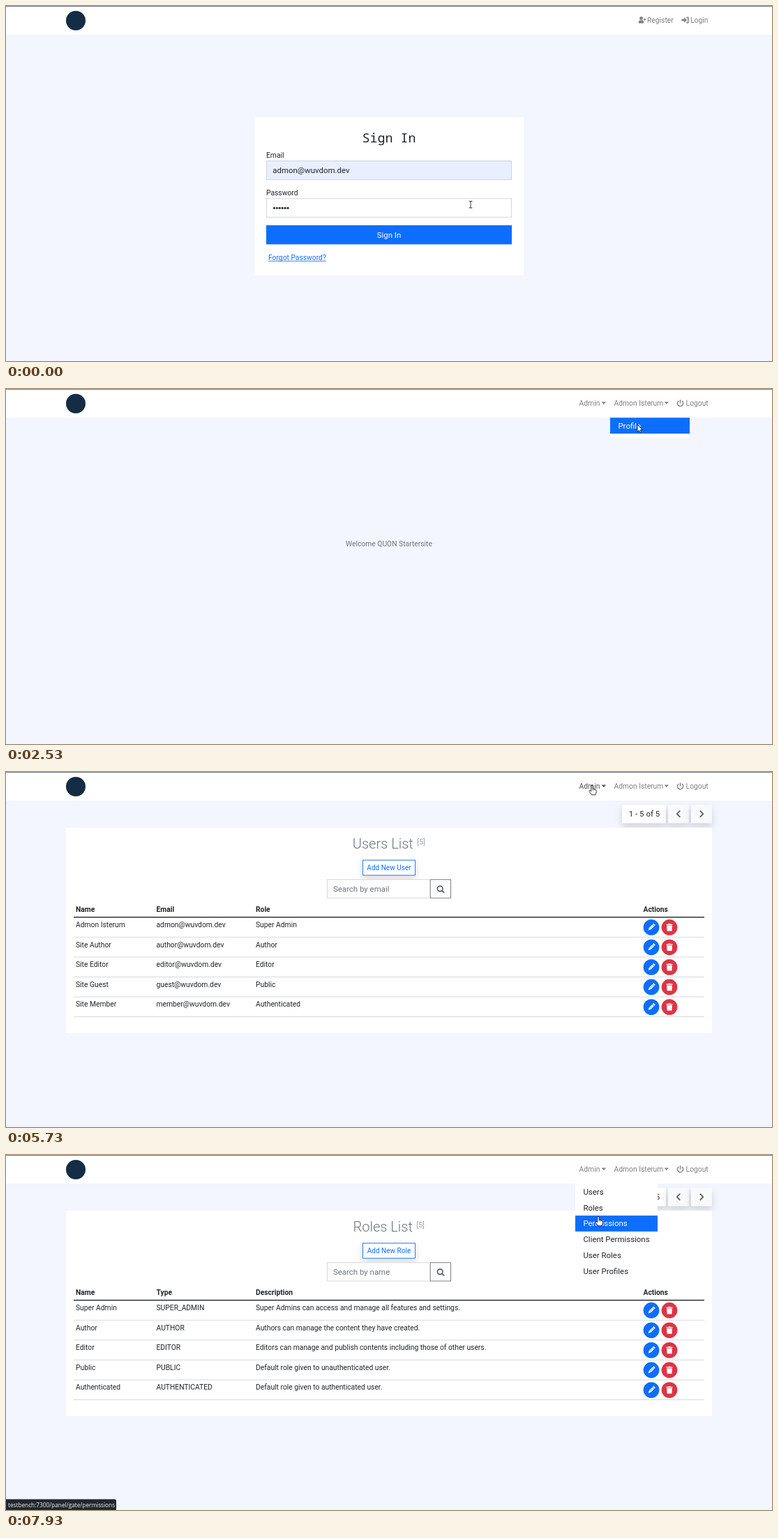
These frames come from a looping animation (1098 px wide and 510 px high, 8000 ms). An HTML page with a canvas:

```html
<!DOCTYPE html>
<html lang="en">
<head>
<meta charset="utf-8">
<title>Admin panel walkthrough</title>
<style>
  html, body { margin: 0; width: 100%; height: 100%; overflow: hidden; background: #f3f6fe; }
  canvas { display: block; width: 1098px; height: 510px; }
</style>
</head>
<body>
<canvas id="stage"></canvas>
<script>
const W = 1098, H = 510, LOOP = 8000, STEP = 200 / 3;
const canvas = document.getElementById('stage');
const dpr = window.devicePixelRatio || 1;
canvas.width = W * dpr;
canvas.height = H * dpr;
const c = canvas.getContext('2d');

const SANS = 'Roboto, sans-serif', MONO = '"Noto Sans Mono", monospace', UI = '"Open Sans", sans-serif';
const BASE = 11.45, SMALL = 10.3;
const INK = '#212529', MUTED = '#6c757d', BLUE = '#0d6efd', RED = '#dc3545', BORDER = '#ced4da';
const PERSON = 'Admon Isterum';
const HOST = 'testbench:7300/panel/gate/';

const adminItems = ['Users', 'Roles', 'Permissions', 'Client Permissions', 'User Roles', 'User Profiles'];

const lists = {
  users: {
    title: 'Users List', add: 'Add New User', search: 'Search by email',
    head: ['Name', 'Email', 'Role'],
    rows: [
      [PERSON, 'admon@wuvdom.dev', 'Super Admin'],
      ['Site Author', 'author@wuvdom.dev', 'Author'],
      ['Site Editor', 'editor@wuvdom.dev', 'Editor'],
      ['Site Guest', 'guest@wuvdom.dev', 'Public'],
      ['Site Member', 'member@wuvdom.dev', 'Authenticated']
    ]
  },
  roles: {
    title: 'Roles List', add: 'Add New Role', search: 'Search by name',
    head: ['Name', 'Type', 'Description'],
    rows: [
      ['Super Admin', 'SUPER_ADMIN', 'Super Admins can access and manage all features and settings.'],
      ['Author', 'AUTHOR', 'Authors can manage the content they have created.'],
      ['Editor', 'EDITOR', 'Editors can manage and publish contents including those of other users.'],
      ['Public', 'PUBLIC', 'Default role given to unauthenticated user.'],
      ['Authenticated', 'AUTHENTICATED', 'Default role given to authenticated user.']
    ]
  }
};

// Timeline: start time, then value
const pages = [[0, 'login'], [800, 'home'], [2730, 'profile'], [5130, 'users'], [6340, 'roles']];

const menus = [
  { from: 2190, to: 2725, x: 866, w: 114, items: ['Profile'] },
  { from: 3930, to: 5070, x: 816, w: 118, items: adminItems },
  { from: 5860, to: 6340, x: 816, w: 118, items: adminItems },
  { from: 7260, to: LOOP, x: 816, w: 118, items: adminItems }
];

const statuses = [
  { from: 500, to: 1370, w: 365, text: 'Waiting for localhost...' },
  { from: 4670, to: 5450, w: 133, text: HOST + 'users' },
  { from: 6270, to: 6800, w: 132, text: HOST + 'roles' },
  { from: 7670, to: 9000, w: 158, text: HOST + 'permissions' }
];

// time, x, y, pointer kind from that time on
const path = [
  [0, 666, 285, 'beam'], [70, 666, 285, 'beam'], [200, 668, 306, 'arrow'], [260, 669, 320, 'hand'],
  [400, 671, 335, 'hand'], [800, 671, 335, 'arrow'], [1000, 710, 213.5, 'arrow'], [1330, 884, 26, 'hand'],
  [1470, 893, 21, 'hand'], [2270, 904, 18, 'hand'], [2400, 905, 45, 'arrow'], [2530, 905, 51, 'arrow'],
  [2860, 905, 51, 'arrow'], [3460, 839, 19.5, 'arrow'], [3530, 839, 19.5, 'hand'], [4060, 839, 19.5, 'hand'],
  [4330, 839, 46, 'arrow'], [4470, 839, 56, 'arrow'], [5260, 839, 56, 'arrow'], [5660, 840, 19, 'hand'],
  [5870, 840, 19, 'hand'], [5930, 841, 67, 'arrow'], [6130, 841, 69, 'arrow'], [6270, 841, 69, 'arrow'],
  [6400, 840, 60, 'arrow'], [6560, 840, 56, 'arrow'], [6930, 840, 19, 'hand'], [7330, 840, 19, 'hand'],
  [7600, 847, 76, 'hand'], [7800, 849, 88, 'hand'], [LOOP, 849, 88, 'hand']
];

function rect(x, y, w, h, color) {
  c.fillStyle = color;
  c.fillRect(x, y, w, h);
}

function box(x, y, x2, y2, fill, stroke = BORDER) {
  rect(x, y, x2 - x, y2 - y, fill);
  c.strokeStyle = stroke;
  c.lineWidth = 0.9;
  c.strokeRect(x + 0.45, y + 0.45, x2 - x - 0.9, y2 - y - 0.9);
}

function disc(x, y, r, color) {
  c.fillStyle = color;
  c.beginPath();
  c.arc(x, y, r, 0, 7);
  c.fill();
}

function line(points, color, width) {
  c.strokeStyle = color;
  c.lineWidth = width;
  c.beginPath();
  points.forEach(([x, y]) => c.lineTo(x, y));
  c.stroke();
}

function poly(points, color) {
  c.fillStyle = color;
  c.beginPath();
  points.forEach(([x, y]) => c.lineTo(x, y));
  c.fill();
}

// y is the middle of the capital letters
function text(str, x, y, size = BASE, color = INK, { align = 'left', weight = 400, family = SANS } = {}) {
  c.font = `${weight} ${size}px ${family}`;
  c.textAlign = align;
  c.fillStyle = color;
  c.fillText(str, x, y + size * 0.355);
  return c.measureText(str).width;
}

function shadowBox(x, y, x2, y2, fill) {
  c.save();
  c.shadowColor = 'rgba(0,0,0,.15)';
  c.shadowBlur = 11 * dpr;
  c.shadowOffsetY = 5 * dpr;
  rect(x, y, x2 - x, y2 - y, fill);
  c.restore();
}

function caret(x, color) {
  poly([[x, 18.6], [x + 6.4, 18.6], [x + 3.2, 21.9]], color);
}

function userPlus(x, color) {
  disc(x + 3.7, 17.7, 2.4, color);
  c.beginPath();
  c.roundRect(x, 20.5, 7.4, 4.3, [2.4, 2.4, 0.8, 0.8]);
  c.fill();
  line([[x + 7, 19.3], [x + 10.6, 19.3]], color, 1.1);
  line([[x + 8.8, 17.5], [x + 8.8, 21.1]], color, 1.1);
}

function signIn(x, color) {
  rect(x, 18.8, 4, 2.7, color);
  poly([[x + 3.6, 16.3], [x + 7.6, 20.15], [x + 3.6, 24]], color);
  line([[x + 6.8, 16.4], [x + 9.4, 16.4], [x + 9.4, 23.9], [x + 6.8, 23.9]], color, 1.5);
}

function power(x, color) {
  c.strokeStyle = color;
  c.lineWidth = 1.5;
  c.beginPath();
  c.arc(x, 20.5, 4.1, -0.95, Math.PI + 0.95);
  c.stroke();
  line([[x, 15.4], [x, 20.5]], color, 1.5);
}

function pencil(x, y) {
  c.save();
  c.translate(x, y);
  c.rotate(Math.PI / 4);
  rect(-1.7, -6.4, 3.4, 2, '#fff');
  rect(-1.7, -3.8, 3.4, 6.4, '#fff');
  poly([[-1.7, 2.6], [1.7, 2.6], [0, 6.2]], '#fff');
  line([[0, -2.6], [0, 2]], BLUE, 0.6);
  c.restore();
}

function trash(x, y) {
  rect(x - 4.5, y - 4.6, 9, 1.3, '#fff');
  rect(x - 1.5, y - 5.4, 3, 1, '#fff');
  poly([[x - 3.9, y - 2.6], [x + 3.9, y - 2.6], [x + 3.4, y + 5.2], [x - 3.4, y + 5.2]], '#fff');
}

function drawNav(page, cur, dx) {
  rect(0, 0, W, 41, '#fff');
  disc(100 + dx, 21, 14, '#142c44');
  const tone = (a, b) => cur.y < 30 && cur.x - dx >= a && cur.x - dx <= b ? '#4d4d4d' : '#7f7f7f';
  const nav = (str, x, a, b) => text(str, x + dx, 20.3, SMALL, tone(a, b));
  if (page === 'login') {
    userPlus(906.8, '#7f7f7f');
    nav('Register', 919, 900, 958);
    signIn(968.4, '#7f7f7f');
    nav('Login', 981, 966, 1008);
  } else {
    nav('Admin', 821.6, 816, 862);
    caret(853.6 + dx, tone(816, 862));
    nav(PERSON, 871.5, 866, 952);
    caret(943.6 + dx, tone(866, 952));
    power(966.5 + dx, '#7f7f7f');
    nav('Logout', 974.6, 956, 1008);
  }
}

function drawLogin(t, cur) {
  rect(356, 160, 386, 227, '#fff');
  text('Sign In', 549, 189.5, 18.37, INK, { align: 'center', family: MONO });
  text('Email', 373, 214.3, SMALL);
  box(373, 222, 725, 250, '#e8f0fe');
  text('admon@wuvdom.dev', 382.3, 236.3);
  text('Password', 373, 268.3, SMALL);
  box(373, 276.3, 725, 303.8, '#fff');
  for (let i = 0; i < 6; i++) disc(384.4 + i * 3.93, 290.2, 1.55, INK);
  const over = cur.y > 315 && cur.y < 342;
  rect(373, 315, 352, 27.4, over ? '#0b5ed7' : BLUE);
  text('Sign In', 549, 328.9, BASE, '#fff', { align: 'center' });
  const w = text('Forgot Password?', 376, 361.5, SMALL, BLUE);
  rect(376, 366.2, w, 0.8, BLUE);
}

function drawHome() {
  text('Welcome QUON Startersite', 549, 222, SMALL, MUTED, { align: 'center' });
}

function field(label, value, x, x2, y) {
  text(label, x, y - 8, SMALL);
  box(x, y, x2, y + 27.3, '#fff');
  text(value, x + 9.2, y + 13.9);
}

function drawProfile() {
  rect(350, 43.5, 386, 467, '#fff');
  text('User Profile', 543, 73.5, 18.37, INK, { align: 'center', family: MONO });
  disc(543.3, 162.5, 71.5, '#9fa8da');
  text('AI', 543, 162.4, 62, '#000', { align: 'center', family: UI });
  field('Name', PERSON, 367, 718.7, 249);
  field('Address', 'Mogadishu', 367, 535, 303.2);
  field('Phone', '+000610204417', 551.7, 718.7, 303.2);
  text('Bio', 367, 349.5, SMALL);
  box(367, 357.4, 718.7, 452.7, '#fff');
  text('Full Stack Developer', 376.2, 370.8);
  line([[711, 451], [716.5, 445.5]], '#555', 0.8);
  line([[714.2, 451], [716.5, 448.7]], '#555', 0.8);
  text('Image', 367, 471.7, SMALL);
  box(367, 479.8, 718.7, 507, '#fff');
  rect(367.9, 480.7, 77.2, 25.4, '#e9ecef');
  rect(445, 480.7, 0.9, 25.4, BORDER);
  text('Choose File', 376.2, 493.6);
  text('No file chosen', 454, 493.6);
}

function drawScrollbar() {
  rect(1086.5, 1, 11.5, 509, '#f1f1f1');
  rect(1087.5, 13, 9.6, 402, '#c1c1c1');
  poly([[1089.3, 9], [1094.7, 9], [1092, 6]], '#a3a3a3');
  poly([[1089.3, 502.5], [1094.7, 502.5], [1092, 505.5]], '#505050');
}

function drawList({ title, add, search, head, rows }) {
  const cols = [100, 215.5, 358, 913.5];
  shadowBox(883, 47, 946, 73.5, '#fff');
  text('1 - 5 of 5', 915, 60.4, BASE, INK, { align: 'center' });
  [[949, 1], [982, -1]].forEach(([x, dir]) => {
    shadowBox(x, 47, x + 30, 73.5, '#f8f9fa');
    const m = x + 15;
    line([[m + 2.2 * dir, 55.6], [m - 2.2 * dir, 60.2], [m + 2.2 * dir, 64.8]], '#5b6168', 1.8);
  });

  rect(86, 80, 926, 295, '#fff');
  c.font = `300 20px ${SANS}`;
  const tw = c.measureText(title).width;
  const left = 549 - (tw + 17.5) / 2;
  text(title, left, 102.8, 20, MUTED, { weight: 300 });
  text('[5]', left + tw + 5.5, 100.2, 11, MUTED, { weight: 300 });

  shadowBox(511, 126.3, 587, 148.7, '#fff');
  box(511, 126.3, 587, 148.7, '#fff', BLUE);
  text(add, 549, 137.3, 10.05, BLUE, { align: 'center' });

  box(460, 154.2, 608.4, 181.5, '#fff');
  text(search, 469, 168.2, BASE, MUTED);
  box(607.8, 154.2, 638, 181.5, '#fff', MUTED);
  c.strokeStyle = '#5b6168';
  c.lineWidth = 1.7;
  c.beginPath();
  c.arc(622.2, 167.6, 3.8, 0, 7);
  c.stroke();
  line([[625, 170.4], [628.2, 173.6]], '#5b6168', 2);

  [...head, 'Actions'].forEach((h, i) => text(h, cols[i], 197.4, SMALL, INK, { weight: 700 }));
  rect(97, 207.9, 904, 1.4, INK);
  rows.forEach((row, i) => {
    const y = i * 28.6;
    row.forEach((cell, k) => text(cell, cols[k], 219.4 + y, SMALL));
    rect(97, 236.8 + y, 904, 0.9, '#d0d4d8');
    disc(925, 223.2 + y, 11.4, BLUE);
    pencil(925, 223.2 + y);
    disc(951, 223.2 + y, 11.4, RED);
    trash(951, 223.2 + y);
  });
}

function drawMenu({ x, w, items }, cur, dx) {
  const top = 41.2, row = 22.9;
  const hover = cur.y < 41 ? -1 : Math.floor((cur.y - top) / row);
  rect(x + dx, 41, w, items.length * row + 5.7, '#fff');
  items.forEach((item, i) => {
    const on = i === hover;
    if (on) rect(x + dx, top + i * row, w, row, BLUE);
    text(item, x + dx + 11.4, 52.6 + i * row, BASE, on ? '#fff' : INK);
  });
}

function drawStatus({ from, to, w, text: label }, t) {
  c.globalAlpha = Math.max(0, Math.min(1, (t - from) / 220, (to - t) / 220));
  c.fillStyle = '#22262f';
  c.beginPath();
  c.roundRect(0, 494.6, w, 16, [0, 2.5, 0, 0]);
  c.fill();
  text(label, 3, 502.9, 8.25, '#f1f3f4', { family: UI });
  c.globalAlpha = 1;
}

const arrowShape = new Path2D('M0 0V10.6L2.4 8.4L4 11.9L5.6 11.2L4.1 7.8H7.3Z');
const handShape = new Path2D('M-1.2 1Q0-.6 1.2 1V5L4 5.7Q6.3 6.2 6.2 8.4L5.9 11Q5.2 12.2 5.1 13.8H-.8Q-1.6 11.8-3.5 9.6Q-4.5 8-3.6 7.5Q-2.4 7.2-1.2 8.8Z');

function drawPointer({ x, y, kind }) {
  if (kind === 'beam') {
    line([[x, y - 4.5], [x, y + 5]], '#222', 0.9);
    [-4.5, 5].forEach(d => line([[x - 2.4, y + d], [x + 2.4, y + d]], '#222', 0.9));
    return;
  }
  const shape = kind === 'hand' ? handShape : arrowShape;
  c.save();
  c.translate(x, y);
  c.fillStyle = '#fff';
  c.strokeStyle = '#111';
  c.lineWidth = 0.85;
  c.lineJoin = 'round';
  c.fill(shape);
  c.stroke(shape);
  if (kind === 'hand') {
    line([[1.2, 5], [1.2, 7.5]], '#111', 0.6);
    line([[3.2, 5.8], [3.2, 7.8]], '#111', 0.6);
  }
  c.restore();
}

function pointerAt(t) {
  const i = Math.max(0, path.findIndex(k => k[0] > t) - 1);
  const [t0, x0, y0, kind] = path[i], [t1, x1, y1] = path[i + 1];
  const p = (t - t0) / (t1 - t0);
  return { x: x0 + (x1 - x0) * p, y: y0 + (y1 - y0) * p, kind };
}

function draw(time) {
  const t = Math.min(LOOP - 1, Math.floor((time + 5) / STEP) * STEP);
  const cur = pointerAt(t);
  const page = pages.filter(p => p[0] <= t).pop()[1];
  const dx = page === 'profile' ? -6 : 0;

  c.setTransform(dpr, 0, 0, dpr, 0, 0);
  rect(0, 0, W, H, '#f3f6fe');
  drawNav(page, cur, dx);
  if (page === 'login') drawLogin(t, cur);
  else if (page === 'home') drawHome();
  else if (page === 'profile') drawProfile();
  else drawList(lists[page]);

  menus.filter(m => t >= m.from && t < m.to).forEach(m => drawMenu(m, cur, dx));
  if (page === 'profile') drawScrollbar();
  statuses.filter(s => t >= s.from && t < s.to).forEach(s => drawStatus(s, t));
  rect(0, 0, W, 1, '#77797c');
  drawPointer(cur);
}

const start = performance.now();
function tick() {
  draw((performance.now() - start) % LOOP);
  requestAnimationFrame(tick);
}
tick();
</script>
</body>
</html>
```
